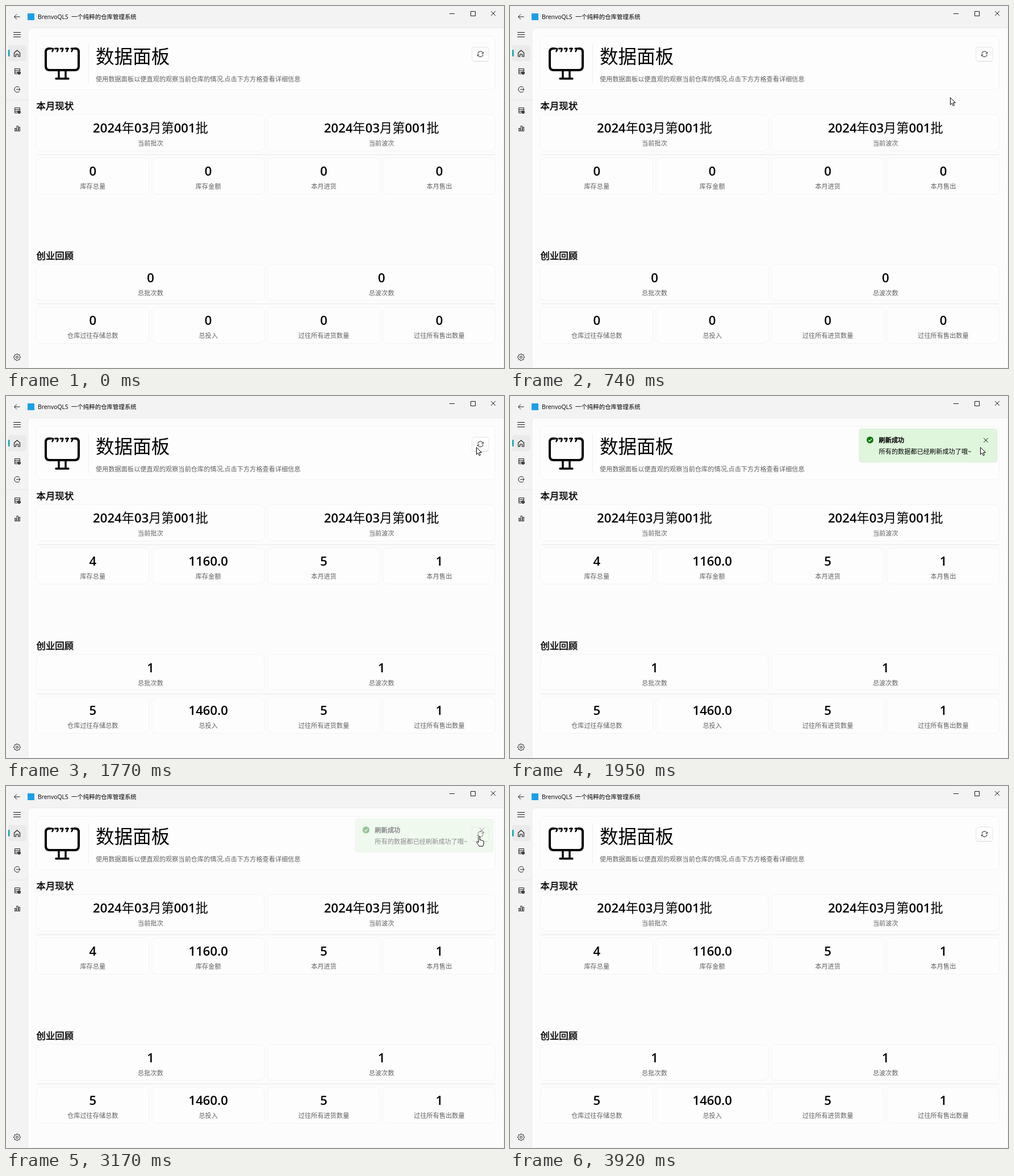
Animation, 877 px wide and 638 px high, one loop 4.59 s. Source, as an HTML page:

```html
<!DOCTYPE html>
<html lang="zh-CN">
<head>
<meta charset="utf-8">
<title>数据面板</title>
<style>
html, body { margin: 0; width: 100%; height: 100%; overflow: hidden; background: #f3f3f3; }
svg { display: block; }
text { font-family: 'Open Sans', 'Noto Sans CJK SC', 'Noto Sans CJK', sans-serif; }
.mid { text-anchor: middle; }
.label { font-size: 11.2px; fill: #606060; }
.num { font-size: 22.2px; font-kerning: none; }
.num .digits { font-weight: 600; }
.semibold { stroke: #000; stroke-width: .5; }
.line { fill: none; stroke: #1a1a1a; stroke-width: 1; }
.card { fill: #fdfdfd; stroke: #f3f3f3; }
.cursor { fill: #fff; stroke: #000; stroke-width: 1; stroke-linejoin: round; }
</style>
</head>
<body>
<svg width="877" height="638" viewBox="0 0 877 638">
  <path d="M38.500 638V45.500q0-7 7-7H877V638Z" fill="#fcfcfc" stroke="#e8e8e8"/>

  <!-- title bar -->
  <path class="line" d="M24.500 19H14.500M19 14.500L14.500 19 19 23.500"/>
  <rect x="38" y="13" width="12" height="12" fill="#1c9fe8"/>
  <text x="56" y="23" font-size="10.4">BrenvoQLS</text>
  <text x="115" y="23" font-size="10.45">一个纯粹的仓库管理系统</text>
  <path class="line" d="M781 13.500H790M818.500 9.500H826.500V17.500H818.500ZM854 9L862 17M862 9L854 17"/>

  <!-- sidebar -->
  <rect x="4" y="69" width="32" height="28" rx="4" fill="#eaeaea"/>
  <rect x="4" y="77" width="2.400" height="12" rx="1.200" fill="#009faa"/>
  <path d="M0 165.500H38" stroke="#e5e5e5"/>
  <g class="line">
    <path d="M13 46.500H26M13 50.500H26M13 54.500H26"/>
    <path d="M14.500 82.500L19.500 78 24.500 82.500V89H21.500V85H17.500V89H14.500Z" stroke-width="1.200"/>
    <g id="stock"><path d="M15.500 110.500H24.500V113.500H15.500ZM15.500 113.500V116.500H21M24.500 113.500V115M15.500 116.500V119.500H20"/>
      <circle cx="23" cy="118" r="2.800" fill="#1a1a1a" stroke="none"/></g>
    <use href="#stock" y="69"/>
    <circle cx="23" cy="118" r=".8" fill="#fff" stroke="none"/>
    <circle cx="23" cy="187" r=".8" fill="#fff" stroke="none"/>
    <path d="M23.800 144A5 5 0 1 0 23.800 150M18 147H25M23 145L25 147 23 149"/>
    <path d="M15.500 215.500H17.500V220.500H15.500ZM18.800 211.500H21.200V220.500H18.800ZM22.500 213.500H24.500V220.500H22.500Z" stroke-width=".9"/>
    <path id="gear"/>
    <circle cx="19.500" cy="619" r="1.900"/>
  </g>

  <!-- header -->
  <rect class="card" x="53.500" y="53.500" width="808" height="94" rx="6"/>
  <g fill="none" stroke="#000" stroke-width="4" stroke-linecap="round" stroke-linejoin="round">
    <path d="M77 75H76Q70 75 70 81V106Q70 113 77 113H121Q128 113 128 106V81Q128 75 122 75H121"/>
    <path d="M93 114V127M105 114V127M88 128H110" stroke-width="3.400"/>
    <path d="M77 75H121" stroke-width="3" stroke-dasharray="4 5.500"/>
    <path id="ticks" stroke-width="2.600"/>
  </g>
  <path d="M145.500 66V136" stroke="#ececec"/>
  <text x="158" y="101" font-size="32.6">数据面板</text>
  <text class="label" x="158" y="132.500">使用数据面板以便直观的观察当前仓库的情况,点击下方方格查看详细信息</text>
  <rect x="820.500" y="72.500" width="30" height="25" rx="4" fill="#fefefe" stroke="#e6e6e6"/>
  <path d="M823 97.500H848" stroke="#d4d4d4"/>
  <path id="refresh" class="line" stroke-width="1.200" d="M830.900 84A4.700 4.700 0 0 1 839.800 82.500M840.100 85.500A4.700 4.700 0 0 1 831.200 87M837.700 83.500L840.300 83.800 840.600 81M833.300 86L830.700 85.800 830.400 88.500"/>

  <!-- sections -->
  <text class="semibold" x="53.500" y="182" font-size="16.4">本月现状</text>
  <text class="semibold" x="53.500" y="446" font-size="16.4">创业回顾</text>
  <path d="M54 262H862M54 525H862" stroke="#eeeeee" stroke-width="1.500"/>
  <g id="cards"></g>

  <g id="toast">
    <rect x="615" y="58" width="243" height="58.500" rx="4" fill="#dff6dd" stroke="#d3ead1" stroke-width=".8"/>
    <circle cx="634" cy="77.500" r="6" fill="#0f7b0f"/>
    <path d="M631.200 77.700L633.200 79.700 637 75.700" fill="none" stroke="#fff" stroke-width="1.200"/>
    <text class="semibold" x="649.500" y="82" font-size="11.2">刷新成功</text>
    <text x="649.500" y="101.500" font-size="11.2">所有的数据都已经刷新成功了哦~</text>
    <path class="line" d="M834 74L842 82M842 74L834 82"/>
  </g>

  <path id="arrow" class="cursor" d="M.5.500V13L3.400 10.300 5.400 15 7.500 14 5.500 9.500H9.500Z"/>
  <path id="hand" class="cursor" d="M-1 10.500V1.200A1.300 1.300 0 0 1 1.600 1.200V6.500C1.900 5.500 3.900 5.700 4 7.100 4.400 6.200 6.200 6.500 6.300 7.700 6.800 7 8.200 7.300 8.200 8.600V12C8.200 15 7.200 15.500 6.800 17.200H.2C0 15.500-2.500 13.500-4 10.300-4.400 8.800-2.600 8.300-1 10.500Z"/>
</svg>
<script>
const LOOP = 4590, STEP = 45.59, LOADED = 1770;
const $ = id => document.getElementById(id);

// rows of cards: top, height, then [label, value before, value after]
const batch = '2024年03月第001批';
const rows = [
  [191.5, 64, ['当前批次', batch, batch], ['当前波次', batch, batch]],
  [267.5, 64, ['库存总量', '0', '4'], ['库存金额', '0', '1160.0'], ['本月进货', '0', '5'], ['本月售出', '0', '1']],
  [455.5, 63, ['总批次数', '0', '1'], ['总波次数', '0', '1']],
  [531, 63.5, ['仓库过往存储总数', '0', '5'], ['总投入', '0', '1460.0'], ['过往所有进货数量', '0', '5'], ['过往所有售出数量', '0', '1']]
];
const styled = s => s.replace(/[\d.]+/g, '<tspan class="digits">$&</tspan>');
const values = [];

$('cards').innerHTML = rows.map(([y, h, ...cells]) => {
  const pitch = 813.6 / cells.length, w = pitch - 5.4;
  return cells.map(([label, before, after], i) => {
    const x = 53.5 + i * pitch, mid = x + w / 2 + .3;
    values.push([before, after]);
    return `<rect class="card" x="${x}" y="${y}" width="${w}" height="${h}" rx="8"/>
      <text class="num mid" x="${mid}" y="${y + 31.2}"></text>
      <text class="label mid" x="${mid}" y="${y + 54}">${label}</text>`;
  }).join('');
}).join('');
const numbers = document.querySelectorAll('.num');

$('ticks').setAttribute('d', [83, 91.5, 100, 108.5, 117].map(x => `M${x} 75q.5 3-1.500 5`).join(''));
$('gear').setAttribute('d', 'M' + Array.from({ length: 32 }, (_, i) => {
  const a = (i - .5) * Math.PI / 16, r = i % 4 < 2 ? 6 : 4.7;
  return `${19.5 + r * Math.cos(a)} ${619 + r * Math.sin(a)}`;
}).join('L') + 'Z');

// pointer path: time, x, y
const path = [
  [140, 520, 611], [365, 650, 368], [640, 751, 188], [733, 775, 161], [1060, 828, 90],
  [2779, 828, 90], [2780, 833, 89], [3240, 833, 89], [3286, 833, 115], [3559, 860, 463],
  [3700, 566, 604], [3833, 620, 545], [3879, 800, 622]
];
const clamp = v => Math.min(1, Math.max(0, v));

function pointer(t) {
  const i = path.findIndex(p => p[0] > t);
  if (i < 1) return path[i ? path.length - 1 : 0].slice(1);
  const [t0, x0, y0] = path[i - 1], [t1, x1, y1] = path[i], k = (t - t0) / (t1 - t0);
  return [x0 + (x1 - x0) * k, y0 + (y1 - y0) * k];
}

let loaded = null;
function draw(t) {
  if (loaded !== t >= LOADED) {
    loaded = t >= LOADED;
    numbers.forEach((n, i) => n.innerHTML = styled(values[i][+loaded]));
  }
  $('refresh').style.opacity = t >= 1640 && t < 1730 ? .6 : 1;

  // the toast slides in from the right edge, later fades away
  const slide = clamp((t - 1780) / 165), fade = clamp((t - 3060) / 200);
  $('toast').setAttribute('transform', `translate(${263 * (1 - slide) ** 2})`);
  $('toast').style.opacity = 1 - fade;

  const q = 140 + Math.floor((t - 140) / STEP) * STEP;
  const [x, y] = pointer(q);
  const shown = t >= 140 && t < 3920;
  const overCard = x < 862 && rows.some(([top, h]) => y > top && y < top + h);
  const overClose = q >= 2780 && q < 3240;
  const hand = overCard || overClose;
  for (const [id, on] of [['arrow', !hand], ['hand', hand]]) {
    $(id).setAttribute('transform', `translate(${Math.round(x)} ${Math.round(y)})`);
    $(id).style.display = shown && on ? '' : 'none';
  }
}

const start = performance.now();
(function tick() {
  draw((performance.now() - start) % LOOP);
  requestAnimationFrame(tick);
})();
</script>
</body>
</html>
```
